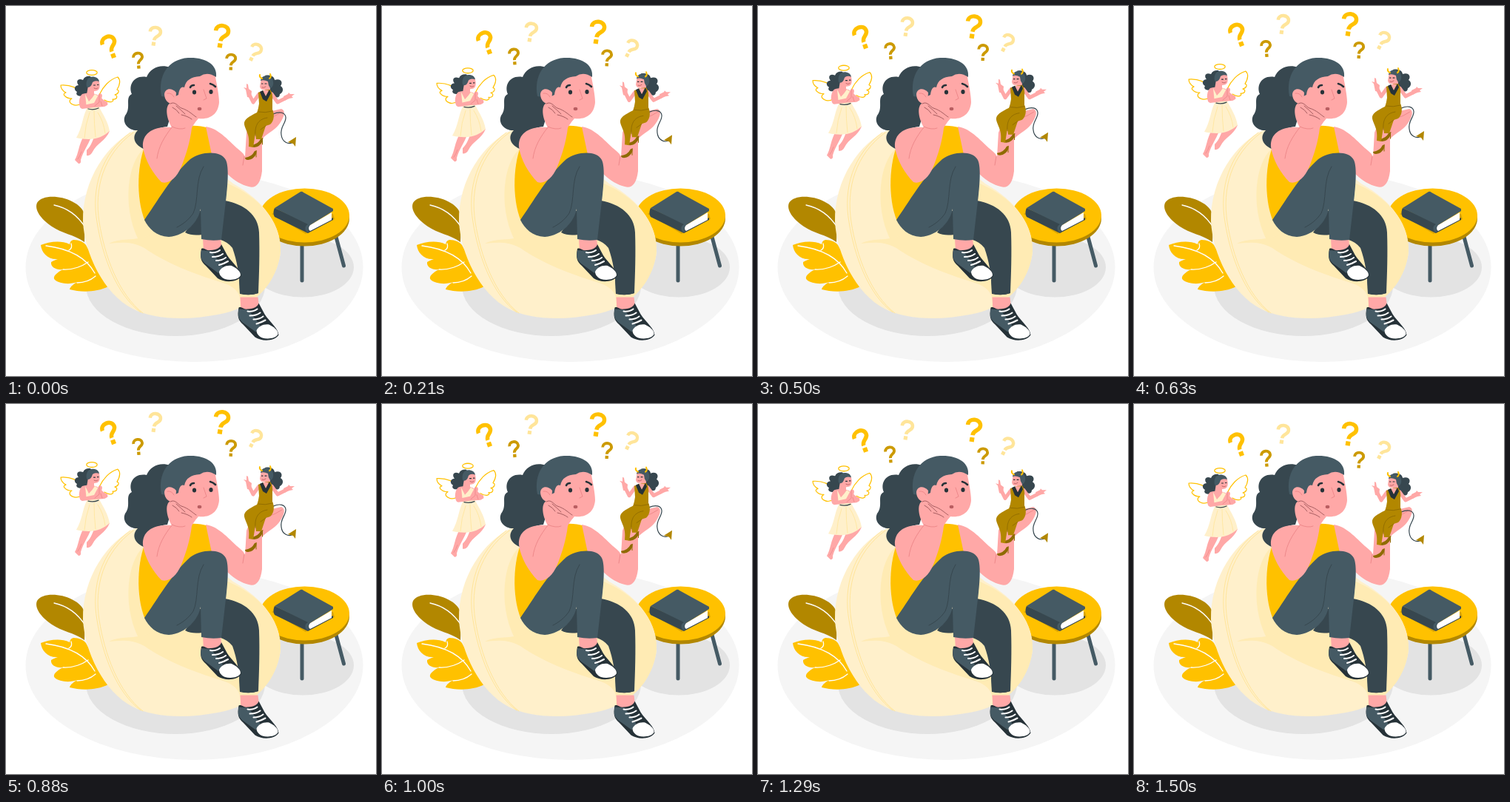
Animation of 500x500 px, one loop 1.54 s. Source, as an HTML page with a canvas:

```html
<!DOCTYPE html>
<html lang="en">
<head>
<meta charset="utf-8">
<title>Between two voices</title>
<style>
html, body { margin: 0; width: 100%; height: 100%; overflow: hidden; background: #fff; }
canvas { display: block; width: 500px; height: 500px; }
</style>
</head>
<body>
<canvas id="stage"></canvas>
<script>
const canvas = document.getElementById('stage');
const ctx = canvas.getContext('2d');
const ratio = window.devicePixelRatio || 1;
canvas.width = canvas.height = 500 * ratio;

const GOLD = '#ffc100', BROWN = '#b28700', OCHRE = '#cc9a00', PALE = '#ffe59a';
const CREAM = '#fff0cb', SAND = '#ffebb4', SKIN = '#ffa8a7', ROSE = '#eb8587';
const SLATE = '#455a64', NAVY = '#37474f', INK = '#263238', WHITE = '#fff';
const LOOP = 1540, STEP = 500 / 12, STEPS = 36;

const cache = new Map();
function shape(d) {
  if (!cache.has(d)) cache.set(d, new Path2D(d));
  return cache.get(d);
}
function fill(color, d) {
  ctx.fillStyle = color;
  ctx.fill(shape(d));
}
function line(color, width, d, cap = 'round') {
  ctx.strokeStyle = color;
  ctx.lineWidth = width;
  ctx.lineCap = cap;
  ctx.lineJoin = 'round';
  ctx.stroke(shape(d));
}
function oval(color, x, y, rx, ry = rx, turn = 0) {
  ctx.fillStyle = color;
  ctx.beginPath();
  ctx.ellipse(x, y, rx, ry, turn, 0, Math.PI * 2);
  ctx.fill();
}
function at(x, y, draw, turn = 0, scale = 1) {
  ctx.save();
  ctx.translate(x, y);
  ctx.rotate(turn * Math.PI / 180);
  ctx.scale(scale, scale);
  draw();
  ctx.restore();
}

function floor() {
  oval('#f5f5f5', 254.5, 353, 228, 128);
  oval('#e3e3e3', 229, 378, 121, 68);
  oval('#e3e3e3', 401, 353, 69, 40.5);
}

function leaves() {
  fill(BROWN, 'M106 319 C92 309 75 307 62 298 C47 288 38 275 42 266 C49 255 73 256 89 264 C99 269 104 274 107 284 Z');
  line(WHITE, 1.3, 'M65 269 C84 273 98 285 107 299');
  fill(GOLD, 'M47 323 C58 319 73 316 86 322 C87 318 88 317 91 316 C99 316 105 319 108 323 L138 379 C123 387 101 387 86 383 C87 379 91 376 96 373 C85 377 72 375 66 370 C62 366 69 360 77 356 C68 357 60 353 61 346 C64 344 67 343 70 342 C56 343 48 333 47 323 Z');
  line(WHITE, 1.3, 'M54 324 C86 328 109 341 120 361 M85 330 C89 328 89 324 88 321 M77 356 C91 357 104 351 111 346 M96 374 C105 374 114 371 121 365');
}

function table() {
  line(SLATE, 5, 'M400 318 L400 371');
  line(SLATE, 5, 'M446 312 L456.500 351');
  oval(BROWN, 403.5, 287, 60.5, 37.5);
  oval(GOLD, 403.5, 283, 60.5, 36.5);
  fill('#d9a400', 'M359 281 L405 308 L444 288 L442 281 L367 276 Z');
  fill(NAVY, 'M363 273 C361 277 361 282 363 285 L408 307 L442 289 L442 286 L411 303 L411 295 Z');
  fill(WHITE, 'M411 296 L440 279 L440 289 L411 304 C408 302 409 298 411 296 Z');
  fill(SLATE, 'M398 251 Q400 250 402 252 L442 274 L442 277 L411 296 C408 298 408 302 410 305 L407 306 C403 302 404 297 408 295 L363 273 Z');
}

function beanbag() {
  fill(CREAM, 'M177 167 C137 184 103 235 104 291 C106 334 132 389 171 409 C199 424 245 425 286 417 C333 410 365 374 371 334 C373 296 348 263 307 240 L250 195 Z');
  fill(SAND, 'M186 193 C164 212 157 270 178 314 L220 314 L215 200 Z');
  fill(SAND, 'M139 321 C154 313 173 318 195 310 L260 298 L298 239 C344 259 372 292 371 331 C368 365 347 394 316 408 C320 389 310 379 290 373 C254 362 215 347 187 327 C171 318 155 319 139 321 Z');
  line(PALE, 1, 'M168 171 C128 200 115 247 123 292 C130 337 149 390 182 414 M172 171 C131 201 119 247 126 292 C133 337 152 390 185 415');
}

function shoe() {
  fill(SKIN, 'M266 314 L290 314 L292 331 L267 332 Z');
  fill(INK, 'M264 328 C262 340 263 345 270 351 L286 368 C295 374 312 374 318 365 C317 355 306 348 299 337 L291 322 C290 326 285 330 276 330 C270 331 268 326 264 328 Z');
  fill(SLATE, 'M264 330 C262 340 264 343 269 348 L287 361 L293 352 L277 331 Z');
  fill(WHITE, 'M288 359 C291 353 297 350 305 351 C311 354 317 358 317 364 C314 370 303 371 296 369 C291 367 288 363 288 359 Z');
  line(WHITE, 2.1, 'M276 333 Q284 334 289 330 M279 339 Q288 339 293 335 M284 344 Q292 344 297 340 M288 350 Q295 348 300 345');
}

function body() {
  fill(GOLD, 'M190 183 C177 211 175 260 188 291 L224 270 L280 221 L281 190 L274 165 C260 161 249 161 238 164 Z');
  fill(SKIN, 'M270 163 C289 166 301 183 318 197 Q322 200 323 204 L325 171 C329 159 341 150 351 144 L372 139 C378 141 377 149 369 160 C362 169 351 173 346 180 L346 223 C344 241 337 247 328 244 C309 240 289 219 278 201 Z');
  line(ROSE, 0.9, 'M322 203 L320 215 M354 152 Q364 149 373 143');
}

function legs() {
  fill(NAVY, 'M296 263 C322 268 341 282 342 306 C343 335 342 363 341 388 C332 391 323 391 316 388 C316 364 312 344 306 327 C298 316 282 313 265 309 C257 310 249 310 242 306 L262 277 Z');
  at(50.5, 79.5, shoe);
  fill(NAVY, 'M315 370 L341 370 L341 388 Q329 392 316 389 Z');
  shoe();
  fill(SLATE, 'M187 289 C202 268 225 228 249 207 C262 197 290 194 297 208 C301 216 300 237 298 255 L291 316 Q278 318 264 315 L263 274 C260 291 244 310 220 312 C203 311 193 301 187 289 Z');
  line(NAVY, 1, 'M267 217 C255 235 261 263 253 280 C247 289 239 295 231 299');
}

function head() {
  fill(NAVY, 'M222 83 C208 78 195 84 190 96 C172 93 165 108 170 119 C160 124 170 137 161 148 C156 159 167 169 178 168 C169 177 174 188 186 193 C184 177 196 165 218 163 L225 140 L224 100 Z');
  fill(SKIN, 'M226 120 L241 101 C254 89 270 89 282 91 C285 106 288 121 288 130 C287 145 277 154 260 152 C252 163 240 167 230 164 Z');
  fill(SLATE, 'M210 122 C205 94 219 72 246 70 C271 69 286 80 284 96 Q272 88 262 95 C250 96 243 100 241 110 C237 108 234 112 233 120 L225 124 Z');
  fill(SKIN, 'M230 117 C224 110 215 111 214 119 C214 128 221 134 229 132 Z');
  line(ROSE, 0.9, 'M218 118 Q224 117 227 123');
  oval(INK, 254.5, 116.5, 2.6, 3);
  oval(INK, 277, 116, 2.6, 3);
  line(INK, 2.6, 'M249 110 Q250 107 254 107 M276 105 Q280 106 283 109');
  line(ROSE, 0.9, 'M267 113 L271 125 L267 127');
  oval('#b95e61', 261.500, 139, 2.8, 2.2);
}

function proppedArm() {
  fill(SKIN, 'M185 190 C184 172 199 162 224 164 C216 150 215 135 222 131 C227 127 232 130 236 134 C243 136 250 143 257 149 C260 154 253 160 251 165 C249 183 243 202 237 217 C230 234 219 241 210 238 C198 226 187 207 185 190 Z');
  line(ROSE, 0.9, 'M224 164 C214 177 206 190 204 206 M224 163 Q235 168 242 165');
  line('#9c5558', 0.9, 'M222 132 C229 128 232 136 237 138 C247 141 252 147 257 150 M225 137 Q231 140 234 145 M230 135 Q237 141 242 146 M237 147 Q246 149 251 153');
}

function question() {
  line(ctx.fillStyle, 5.5, 'M-8.500 -6 C-9 -16 8 -17 8.500 -7 C9 0 0 -1 0 7', 'butt');
  ctx.fillRect(-3, 10, 6.2, 6);
}

function questions() {
  const marks = [
    [140.5, 55, -20, 1, GOLD], [201, 40.5, 9, .83, PALE], [178.5, 73.5, -5, .7, OCHRE],
    [291, 40.5, 9, 1, GOLD], [304, 75.5, 2, .7, OCHRE], [336, 62.5, 27, .8, PALE]
  ];
  for (const [x, y, turn, scale, color] of marks) {
    ctx.fillStyle = color;
    at(x, y, question, turn, scale);
  }
}

function angel() {
  line(GOLD, 1.2, 'M104 118 C97 111 87 106 74 107 C74 112 77 115 81 117 C78 118 77 120 80 122 C83 125 86 125 89 125 C85 127 85 131 90 133 Q96 136 103 131');
  line(GOLD, 1.2, 'M126 120 C131 109 140 99 151 96 C156 101 153 108 150 113 C154 114 152 119 147 120 C152 121 150 127 144 126 C147 129 141 132 133 127');
  fill(SKIN, 'M106 174 L115 177 C111 188 104 197 101 208 Q102 213 98 213 L93 208 C98 200 98 187 106 174 Z');
  fill(SKIN, 'M122 170 L140 169 C135 182 122 186 117 197 Q114 203 109 202 L109 195 C116 188 117 181 122 170 Z');
  line(ROSE, .7, 'M102 197 Q100 203 97 207');
  fill(NAVY, 'M114 95 C106 94 105 99 104 100 C97 97 94 102 98 107 C91 108 92 114 96 116 C93 120 99 123 103 121 C105 127 112 123 114 118 L119 102 Z');
  fill(SKIN, 'M111 108 L116 98 Q124 97 126 102 C128 111 126 115 119 115 L119 121 L109 120 Z');
  fill(SLATE, 'M109 109 C107 99 113 94 120 96 Q125 97 126 102 Q120 100 117 103 Q115 110 111 110 Z');
  line(INK, 1.2, 'M118.500 107 L120.500 107 M123.500 106.500 L125 106.500');
  line('#b95e61', .9, 'M119 111 Q122 113 124 111');
  fill(SKIN, 'M103 119 C109 117 119 117 125 121 L133 128 Q139 131 137 134 L123 137 L101 138 C97 133 99 122 103 119 Z');
  fill(CREAM, 'M107 119 L112 129 Q117 124 120 119 L125 122 L126 137 C132 148 138 157 140 169 C130 178 117 183 95 178 C103 165 103 151 109 139 Z');
  line(PALE, .8, 'M113 144 Q107 161 106 178 M119 142 Q119 159 121 177 M124 144 Q132 156 134 172');
  line(NAVY, 1.3, 'M111 139 Q118 141 125 138');
  fill(SKIN, 'M101 127 C105 130 105 134 105 134 L119 131 L125 120 Q129 116 130 121 L129 126 L137 130 Q138 134 133 136 L119 137 L103 139 Q98 138 101 127 Z');
  line(ROSE, .8, 'M120 135 L126 130 L126 119 M130 135 L128 129');
  ctx.strokeStyle = GOLD;
  ctx.lineWidth = 1.3;
  ctx.beginPath();
  ctx.ellipse(116, 90, 7.2, 3.4, 0, 0, Math.PI * 2);
  ctx.stroke();
}

function heel() {
  fill('#8f6b00', 'M323 205 Q332 204 336 196 L339 195 L338 200 Q335 207 327 208 Q323 208 323 205 Z');
  line('#8f6b00', 1, 'M338 197 L338 204');
}

function devil() {
  line(NAVY, 1.2, 'M361 146 C370 142 377 144 378 150 C379 158 370 163 372 174 C373 184 382 188 388 184');
  fill(BROWN, 'M392 177 L391 190 L388 186 L381 184 Z');
  fill(NAVY, 'M350 94 C359 92 363 97 363 100 C371 97 375 103 371 108 C377 112 373 118 370 119 C370 125 364 124 361 121 C355 124 353 117 353 113 Z');
  fill(SKIN, 'M345 97 Q353 94 357 99 L357 119 L349 121 L350 113 Q344 114 343 109 Z');
  fill(SLATE, 'M344 101 C345 94 354 91 360 99 C363 105 360 111 357 111 Q354 107 354 102 Q348 99 344 101 Z');
  line(GOLD, 2, 'M346 98 Q342 96 343 93 M356 98 Q359 96 357 92');
  line(INK, 1.2, 'M345.500 105 L347 105 M350 105 L352 105');
  line('#b95e61', .9, 'M346 110 Q349 111 351 109');
  line(SKIN, 5, 'M342 119 L334 130 L329 120');
  fill(SKIN, 'M326 123 L324 113 L321 110 L325 111 L325 105 L327 106 L328 112 L332 115 L331 124 Z');
  line(SKIN, 5, 'M359 119 L367 130 L377 125');
  fill(SKIN, 'M375 122 L381 119 L382 117 L384 119 L390 119 L386 122 L388 124 L383 125 L376 128 Z');
  line(SKIN, 4, 'M333 177 L330 200 M344 172 L340 185');
  at(0, 0, heel);
  at(8.500, -17, heel);
  fill(BROWN, 'M341 139 L359 138 C364 146 362 156 357 160 L351 162 L345 180 L338 180 L337 172 L334 191 L328 190 C330 174 324 169 322 160 C321 153 329 149 339 144 Z');
  fill(BROWN, 'M341 117 L348 114 L357 113 Q361 118 360 127 L360 142 Q350 145 340 143 L342 132 Z');
  fill(SKIN, 'M347 114 L355 114 L351 123 Z');
  fill(INK, 'M343 116 L347 114 L351 122 L356 113 L358 118 L352 129 L347 126 Z');
  line('#8f6b00', .9, 'M341 143 Q350 145 360 142 M353 151 C339 153 336 164 337 175 M351 162 L344 167');
}

function render(time) {
  const step = Math.min(STEPS, Math.floor((time % LOOP + 4) / STEP));
  const lift = 1 - Math.abs(1 - step / (STEPS / 2));
  ctx.setTransform(ratio, 0, 0, ratio, 0, 0);
  ctx.fillStyle = WHITE;
  ctx.fillRect(0, 0, 500, 500);
  [floor, leaves, table, beanbag, body, legs, head, proppedArm].forEach(draw => draw());
  at(0, -19 * lift, questions);
  at(0, -9.5 * lift, angel);
  at(0, -9.5 * lift, devil);
}

const start = performance.now();
function tick() {
  render(performance.now() - start);
  requestAnimationFrame(tick);
}
tick();
</script>
</body>
</html>
```
